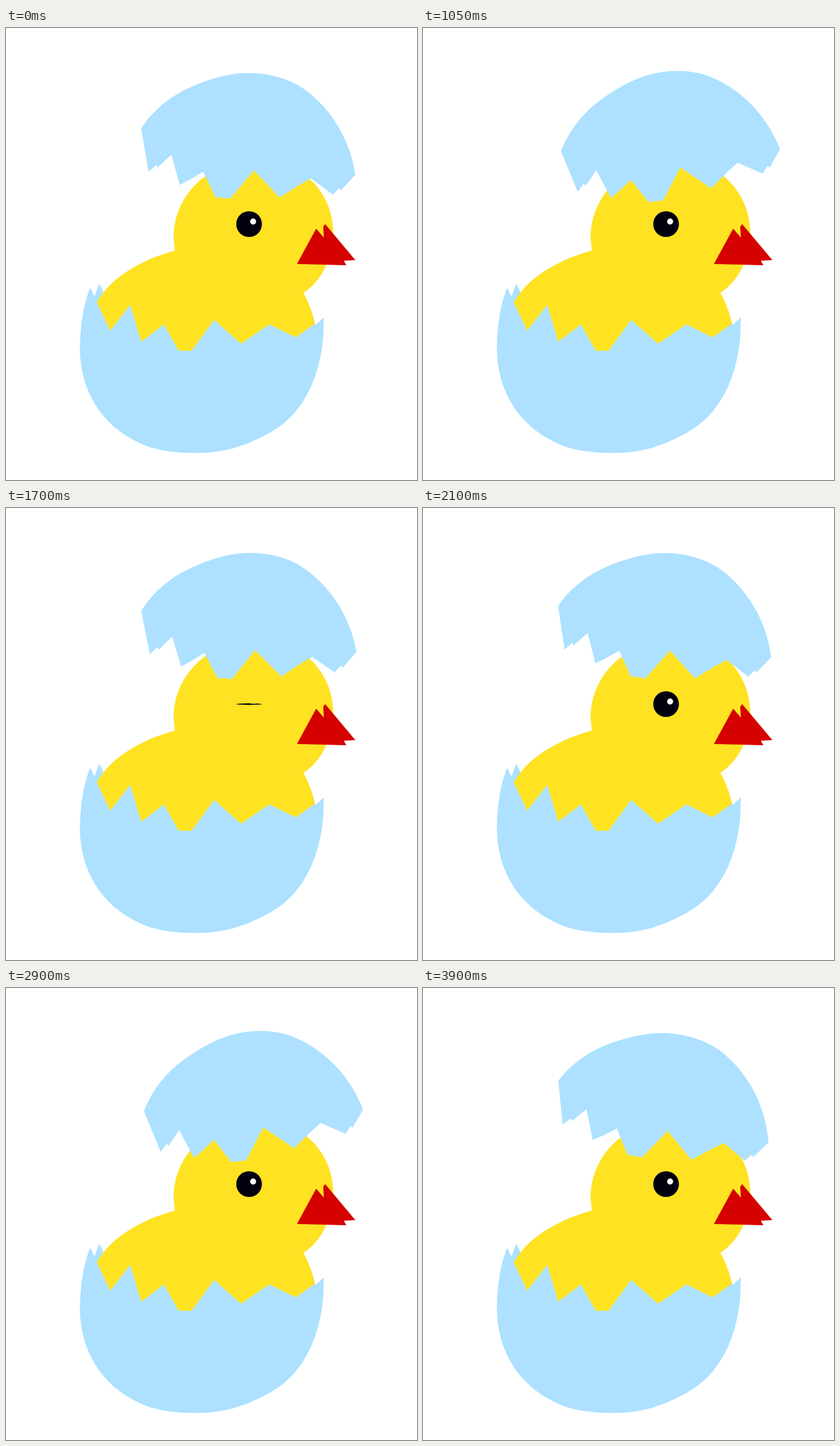
These frames come from a looping animation (640 px wide and 703 px high, 4.05 s). An HTML page with a canvas:

```html
<!DOCTYPE html>
<html lang="en">
<head>
<meta charset="utf-8">
<title>Hatching chick</title>
<style>
  html, body { margin: 0; width: 100%; height: 100%; overflow: hidden; background: #fff; }
  canvas { display: block; width: 640px; height: 703px; }
</style>
</head>
<body>
<canvas id="stage" width="640" height="703"></canvas>
<script>
const ctx = document.getElementById('stage').getContext('2d');

const LOOP = 4050, STEP = 50, LAST = 3900;
const SHELL = '#ade1ff', YELLOW = '#ffe222', RED = '#d60000', BLACK = '#02000f';

const lowerShell = new Path2D(`M131 404 L139 420 L141.5 427 L162 471 L193.5 430.5 L210.5 488
  L246 461 L269 502 L289 502 L324 454 L366 491 L410 461 L451 481 L481 460 L483 461 L494.5 450
  C497 522 472 598 408 631 C373 650 340 661 297 661 C262 661 230 657 205 644
  C150 618 115 565 115 497 C116 460 120 432 131 404 Z`);
const backTooth = new Path2D('M138 417 L145 398 L151 409 L156 425 L141 430 Z');
const body = new Path2D(`M141 427 C164 387 210 361 263 346 L400 330 L463 412
  C471 426 477 442 481 459 L481 520 L170 520 L162 470 Z`);
const head = new Path2D(`M463 412 C493 393 509.5 355 509.5 318 C509.5 285 495 254 472 234
  C440 200 340 200 310 231 C280 252 261 288 261 325 L263 347 L300 412 Z`);
const beak = new Path2D('M453 367 L483 312 L495 326 L494 309 L497 305 L544 361 L526 362 L530 369 Z');
const cap = new Path2D(`M210.5 156 L222 223.5 L234 213 L236 217 L257.5 197 L270.5 244 L286 236
  L307 223.5 L326 263 L349 265.5 L386 221.5 L426 263.5 L457 244 L475 234 L509 259
  L519 249 L522 252 L544 228 C535 170 503 119 455 89 C431 76 405 70 377 70
  C346 69.5 307 82 275 98 C245 114 224 135 210.5 156 Z`);

// [time in ms, cap angle in degrees]
const swing = [[0, 0], [600, -8.3], [1050, -12.7], [1700, -1.45], [1980, 3.5],
               [2550, -6.7], [2915, -12.9], [3250, -7.2], [3900, 4.2]];
const PIVOT = { x: 373, y: 154 };
const EYE = { x: 378.5, y: 305 };
const BLINK = { period: 1400, at: 300, half: 75, shut: 0.06 };

function capAngle(t) {
  const i = Math.max(1, swing.findIndex(key => key[0] >= t));
  const [t0, a0] = swing[i - 1], [t1, a1] = swing[i];
  return a0 + (a1 - a0) * (t - t0) / (t1 - t0);
}

function eyeOpen(t) {
  const { period, at, half, shut } = BLINK;
  const phase = (t - at + period) % period;
  const near = Math.min(phase, period - phase);
  return shut + (1 - shut) * Math.min(1, near / half);
}

function fill(path, color) {
  ctx.fillStyle = color;
  ctx.fill(path);
}

function disc(x, y, r, color) {
  ctx.fillStyle = color;
  ctx.beginPath();
  ctx.arc(x, y, r, 0, Math.PI * 2);
  ctx.fill();
}

function drawEye(open) {
  ctx.save();
  ctx.translate(EYE.x, EYE.y);
  ctx.scale(1, open);
  disc(0, 0, 20, BLACK);
  disc(6.3, -4, 4.7, '#fff');
  ctx.restore();
}

function drawCap(degrees) {
  ctx.save();
  ctx.translate(PIVOT.x, PIVOT.y);
  ctx.rotate(degrees * Math.PI / 180);
  ctx.translate(-PIVOT.x, -PIVOT.y);
  fill(cap, SHELL);
  ctx.restore();
}

function draw(t) {
  ctx.fillStyle = '#fff';
  ctx.fillRect(0, 0, 640, 703);
  fill(backTooth, SHELL);
  fill(body, YELLOW);
  fill(head, YELLOW);
  fill(beak, RED);
  drawEye(eyeOpen(t));
  fill(lowerShell, SHELL);
  drawCap(capAngle(t));
}

function tick() {
  const t = performance.now() % LOOP;
  draw(Math.min(LAST, Math.floor(t / STEP) * STEP));
  requestAnimationFrame(tick);
}
tick();
</script>
</body>
</html>
```
